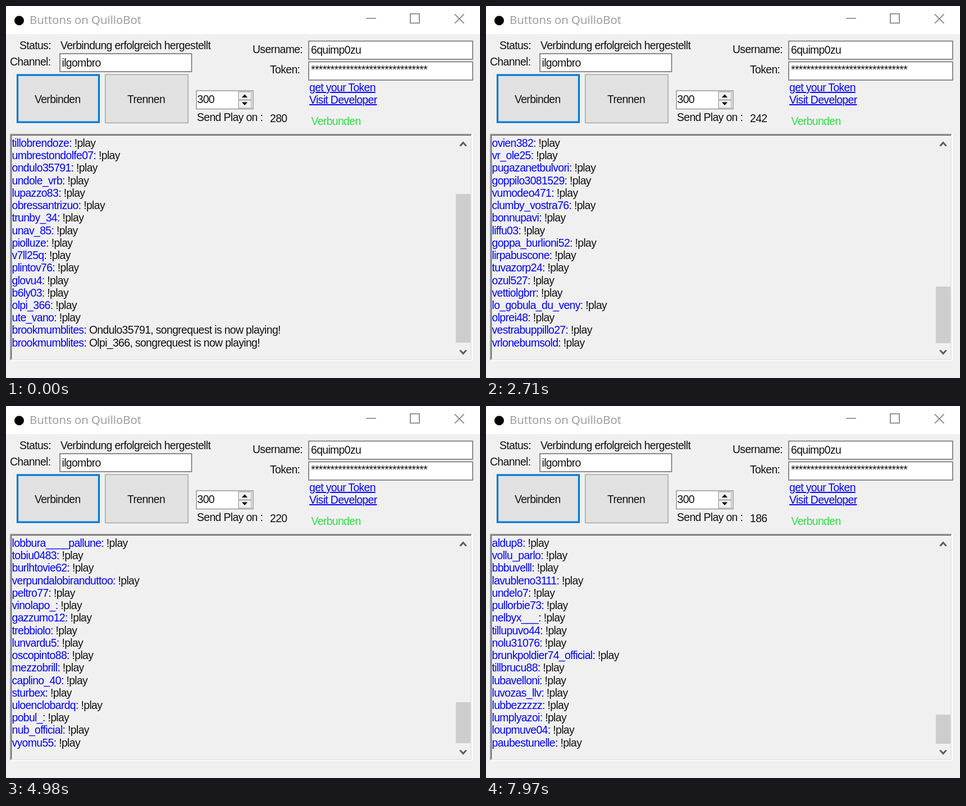
These frames come from a looping animation (844x663 px, 8000 ms). An HTML page:

```html
<!DOCTYPE html>
<html lang="de">
<head>
<meta charset="utf-8">
<title>Chat window</title>
<style>
  html, body { margin: 0; width: 100%; height: 100%; overflow: hidden; background: #f0f0f0; }
  svg { display: block; width: 844px; height: 663px; }
  text { font: 19.4px "Liberation Sans", Arial, sans-serif; letter-spacing: -.64px; fill: #111; }
  .title { font: 20.4px "Open Sans", "Noto Sans", sans-serif; letter-spacing: 0; fill: #929a92; }
  .link, .name { fill: #00f; }
  .link { text-decoration: underline; }
  .box { fill: #fff; stroke: #7a7a7a; stroke-width: 1.7; }
  .spin { fill: #f0f0f0; stroke: #b0b0b0; stroke-width: 1.5; }
  .icon { fill: none; stroke: #777; stroke-width: 1.6; }
  .chevron { fill: none; stroke: #5c5c5c; stroke-width: 3; }
</style>
</head>
<body>
<svg viewBox="0 0 844 663">
  <rect width="844" height="663" fill="#f0f0f0"/>
  <rect width="844" height="50" fill="#fff"/>
  <circle cx="23.5" cy="26" r="8.5"/>
  <text class="title" x="42" y="32">Buttons on QuilloBot</text>
  <path class="icon" d="M641.500 22h17.500M720 14h16v16.500h-16zM799 14.500l16.500 16.500m0-16.500l-16.500 16.500"/>

  <text x="24" y="77">Status:</text>
  <text x="97" y="77">Verbindung erfolgreich hergestellt</text>
  <text x="7" y="106">Channel:</text>
  <rect class="box" x="96" y="85" width="234.500" height="32"/>
  <text x="99.500" y="108">ilgombro</text>

  <text x="439" y="84">Username:</text>
  <rect class="box" x="539" y="62.500" width="292" height="32.500"/>
  <text x="543" y="85">6quimp0zu</text>
  <text x="470" y="120">Token:</text>
  <rect class="box" x="539" y="99.500" width="292" height="32.500"/>
  <text x="543" y="120">******************************</text>

  <rect x="20.500" y="123" width="145" height="84" fill="#e1e1e1" stroke="#0078d7" stroke-width="3.200"/>
  <text x="51" y="172.500">Verbinden</text>
  <rect x="176.800" y="122.300" width="147.500" height="86" fill="#e1e1e1" stroke="#adadad" stroke-width="1.700"/>
  <text x="216" y="172.500">Trennen</text>

  <rect class="box" x="339" y="151" width="101" height="32.500" style="stroke:#a0a0a0"/>
  <text x="340.500" y="172.500">300</text>
  <path class="spin" d="M414 153h23v14h-23zM414 168h23v14h-23z"/>
  <path d="M420 163l5-5.500 5 5.500zM420 171.500h10l-5 5.500z"/>
  <text x="340" y="205">Send Play on :</text>
  <text id="count" x="470" y="206.500"></text>

  <text class="link" x="540" y="152">get your Token</text>
  <text class="link" x="540" y="174">Visit Developer</text>
  <text x="543.500" y="212" style="fill:#32d84b">Verbunden</text>

  <path d="M7.800 632V228.500H830" fill="none" stroke="#a0a0a0" stroke-width="1.700"/>
  <path d="M9.500 630V230.200H828" fill="none" stroke="#696969" stroke-width="1.700"/>
  <path d="M9 630.300H828.300V231" fill="none" stroke="#e3e3e3" stroke-width="1.700"/>
  <path d="M7 632H830V228" fill="none" stroke="#fff" stroke-width="1.700"/>
  <g id="chat"></g>
  <rect id="thumb" x="801" width="26" fill="#cdcdcd"/>
  <path class="chevron" d="M808.500 249.500l5.500-6 5.500 6M808.500 613.500l5.500 6 5.500-6"/>
</svg>
<script>
const LOOP = 8000, ROWS = 17, NOTE = 55;

const lines = `tillobrendoze umbrestondolfe07 ondulo35791 undole_vrb lupazzo83 obressantrizuo
trunby_34 unav_85 piolluze v7ll25q plintov76 glovu4 b6ly03 olpi_366 ute_vano brookmumblites
brookmumblites clooprune tubbix ilgobbedurvano zzundolozz41 pulegro olbrey364 lumbervodalis4
lhu_pob porvlun goulnebia_05 lockubandire lumokeke vontel44 pesco_blu7 grumolino tavix302
noddapelo sbirulo_81 quenzo15 mirtovanda zolfo_09 ovien382 vr_ole25 pugazanetbulvori
goppilo3081529 vumodeo471 clumby_vostra76 bonnupavi liffu03 goppa_burlioni52 lirpabuscone
tuvazorp24 ozul527 vettiolgbrr lo_gobula_du_veny olprei48 vestrabuppillo27 vrlonebumsold
lumplyazoi bovelluvirdopasse gobbiu2874 uvmen06 xxtrunbexx bovulopirda lobbura____pallune
tobiu0483 burlhtovie62 verpundalobiranduttoo peltro77 vinolapo_ gazzumo12 trebbiolo lunvardu5
oscopinto88 mezzobrill caplino_40 sturbex uloenclobardq pobul_ nub_official vyomu55
barvolienpattus tru_554 grvnk2888 obuloviunda lobucerumpan zbonulys_ umosprulg plavy260813
xvoluneo luphhh_63 bunniepralo lavy25093117 vurlazclouder volbun_vrl2886 lubarozena brups456
4unbhely aldup8 vollu_parlo bbbuvelll lavubleno3111 undelo7 pullorbie73 nelbyx___ tillupuvo44
nolu31076 brunkpoldier74_official tillbrucu88 lubavelloni luvozas_llv lubbezzzzz lumplyazoi
loupmuve04 paubestunelle`.split(/\s+/).map(name => ({ name, msg: '!play' }));
lines[15].msg = 'Ondulo35791, songrequest is now playing!';
lines[16].msg = 'Olpi_366, songrequest is now playing!';
lines[NOTE].msg = 'Per accelerare basta usare !boost !sprint e !cheat';

// Bursts of new lines: first step (ms), last step (ms), steps, lines added
const bursts = [
  [910, 1210, 5, 12], [1380, 1710, 5, 9], [2010, 2710, 10, 17], [3570, 3570, 1, 1],
  [4100, 4330, 4, 9], [4430, 4800, 5, 9], [4920, 5040, 3, 6], [5200, 5610, 6, 11],
  [7160, 7160, 1, 4], [7290, 7840, 8, 16], [7970, 7970, 1, 1]
];

function scrolled(t) {
  let total = 0;
  for (const [start, end, steps, added] of bursts) {
    if (t < start) break;
    const gap = (end - start) / (steps - 1 || 1);
    const done = t >= end ? steps : Math.floor((t - start) / gap) + 1;
    total += Math.round(added * done / steps);
  }
  return total;
}

const $ = id => document.getElementById(id);
const make = (tag, parent) =>
  parent.appendChild(document.createElementNS('http://www.w3.org/2000/svg', tag));

const rows = Array.from({ length: ROWS }, (_, i) => {
  const row = make('text', $('chat'));
  row.setAttribute('x', 10.5);
  row.setAttribute('y', 251 + i * 22.23);
  const name = make('tspan', row), msg = make('tspan', row);
  name.setAttribute('class', 'name');
  return { name, msg };
});

let shown = -1;
function draw(n) {
  rows.forEach((row, i) => {
    const line = lines[n + i];
    row.name.textContent = line.name + ':';
    row.msg.textContent = ' ' + line.msg;
  });
  // Only !play messages count down
  $('count').textContent = 280 - n + (n + ROWS > NOTE);
  const height = 6150 / (23.2 + n), bottom = 600 + n / 60;
  const top = Math.round(bottom - height);
  $('thumb').setAttribute('y', top);
  $('thumb').setAttribute('height', Math.round(bottom) - top);
}

const begin = performance.now();
function tick() {
  const n = scrolled((performance.now() - begin) % LOOP);
  if (n !== shown) draw(shown = n);
  requestAnimationFrame(tick);
}
tick();
</script>
</body>
</html>
```
